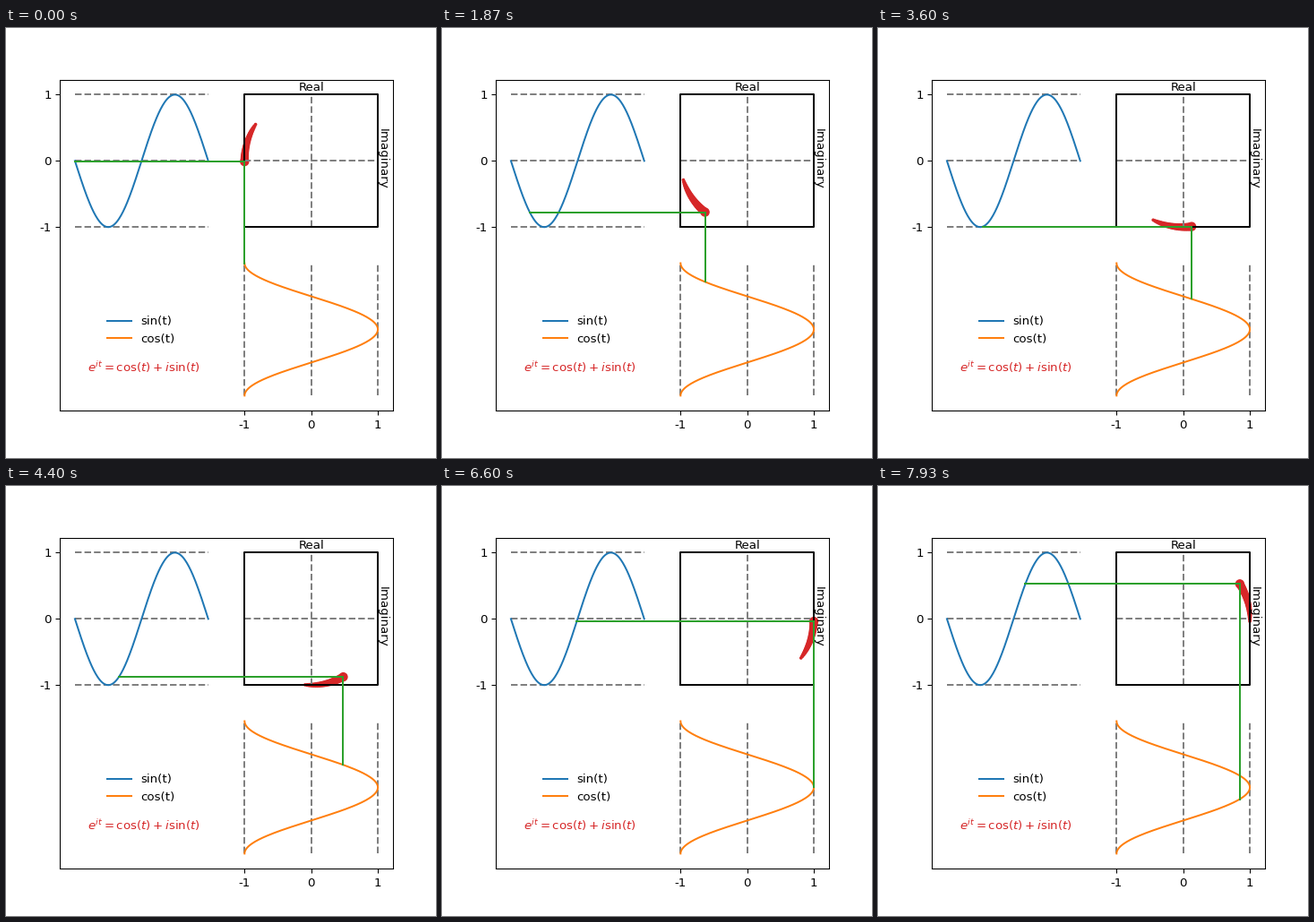
A matplotlib script that plays this animation: 480x480 px, repeating every 8 s.

```python
import numpy as np
import matplotlib.pyplot as plt
from matplotlib.animation import FuncAnimation

FRAMES = 120
LOOP_MS = 8000
FAR = -3.545      # outer end of both waves
TRAIL = 20        # dots in the comet tail
STEP = 1.79       # degrees per frame, and between tail dots
START = 0.6       # degrees already turned at the start

plt.rcParams.update({"font.family": "DejaVu Sans", "font.size": 10})
fig, ax = plt.subplots(figsize=(5, 5), dpi=96)
ax.set_xlim(-3.7727, 1.2273)
ax.set_ylim(-3.7727, 1.2273)
ax.set_xticks([-1, 0, 1], ["-1", "0", "1"])
ax.set_yticks([-1, 0, 1], ["-1", "0", "1"])


def dashed(x, y):
    ax.plot(x, y, "--", color="gray", lw=1.5)


for level in (-1, 0, 1):
    dashed([FAR, FAR + 2], [level, level])
    dashed([level, level], [FAR, FAR + 2])
dashed([-1, 1], [0, 0])
dashed([0, 0], [-1, 1])
ax.plot([-1, 1, 1, -1, -1], [-1, -1, 1, 1, -1], color="black", lw=1.5)

# One turn, starting at the left side of the circle
turn = np.linspace(0, 2 * np.pi, 200)
sine, = ax.plot(FAR + turn / np.pi, -np.sin(turn), "C0", label="sin(t)")
cosine, = ax.plot(-np.cos(turn), FAR + 2 - turn / np.pi, "C1", label="cos(t)")

ax.text(0, 1.02, "Real", ha="center", va="bottom")
ax.text(1.075, 0.03, "Imaginary", rotation=270, ha="center", va="center")
ax.text(-3.35, -3.195, r"$e^{it} = \mathrm{cos}(t) + i\mathrm{sin}(t)$", color="C3")
ax.legend(handles=[sine, cosine], frameon=False, loc="upper left",
          bbox_to_anchor=(107.7 / 480, 1 - 316 / 480),
          bbox_transform=fig.transFigure, borderaxespad=0)

sizes = np.append(np.linspace(3, 36, TRAIL - 1), 46)
tail = ax.scatter(np.zeros(TRAIL), np.zeros(TRAIL), s=sizes, color="C3", zorder=1)
across, = ax.plot([], [], "C2", lw=1.5)
down, = ax.plot([], [], "C2", lw=1.5)


def update(k):
    deg = START + STEP * k
    a = np.radians(deg - STEP * np.arange(TRAIL)[::-1])
    tail.set_offsets(np.column_stack([-np.cos(a), -np.sin(a)]))
    x, y = -np.cos(a[-1]), -np.sin(a[-1])
    along = deg / 180
    across.set_data([FAR + along, x], [y, y])
    down.set_data([x, x], [y, FAR + 2 - along])
    return tail, across, down


anim = FuncAnimation(fig, update, frames=FRAMES, interval=LOOP_MS / FRAMES,
                     repeat=True, repeat_delay=0, blit=False)
plt.show()
```
